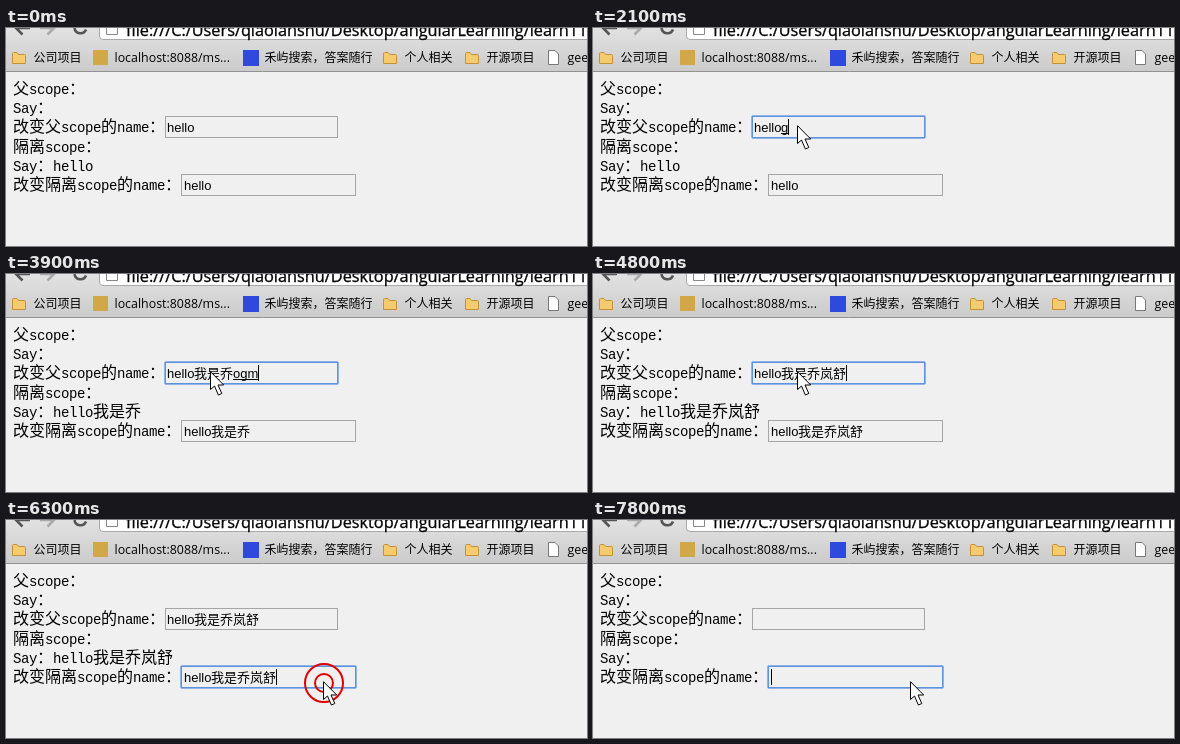
An HTML page for the animation above (8 s loop, 581 px wide and 218 px high).

```html
<!DOCTYPE html>
<html lang="zh-CN">
<head>
<meta charset="utf-8">
<title>Scope demo</title>
<style>
  html, body { margin: 0; width: 100%; height: 100%; overflow: hidden; background: #f0f0f0; }
  svg { display: block; }
  text { white-space: pre; fill: #000; }
  .page { font: 14px "Liberation Mono", monospace; letter-spacing: -.4px; }
  .page .cjk { font: 300 16px "Noto Sans CJK SC", "Noto Sans CJK", sans-serif; letter-spacing: 0; }
  .field { font: 13px "Liberation Sans", "Noto Sans CJK SC", "Noto Sans CJK", sans-serif; }
  .mark { font: 12.4px "Open Sans", sans-serif; }
  .mark .cjk { font: 12px "Noto Sans CJK SC", "Noto Sans CJK", sans-serif; }
  .url { font: 16.3px "Open Sans", sans-serif; stroke: #000; stroke-width: .3; }
</style>
</head>
<body>
<svg width="581" height="218" viewBox="0 0 581 218">
  <defs>
    <linearGradient id="bar" x2="0" y2="1">
      <stop offset="0" stop-color="#e2e2e2"/>
      <stop offset="1" stop-color="#cbcbcb"/>
    </linearGradient>
    <path id="folder" d="M.5 13.5V3.5Q.5 2.5 1.5 2.5H5L6.5 4.5H12.5Q13.5 4.5 13.5 5.5V13.5Z" fill="#f5cb70" stroke="#c4913a"/>
    <path id="sheet" d="M2.5 .5H9L12.5 4V14.5H2.5Z" fill="#fff" stroke="#777"/>
    <rect id="tan" width="15" height="15" fill="#d2a748"/>
    <rect id="blue" width="16" height="16" fill="#2f49dc"/>
    <path id="arrow" d="M.5 .7V18.5L4.5 15L8.4 24L11.8 22.5L8 14H13.7Z" fill="#fff" stroke="#000"/>
  </defs>
  <rect width="581" height="218" fill="#f0f0f0"/>
  <rect width="581" height="43" fill="url(#bar)"/>
  <path d="M0 43.5H581" stroke="#919191"/>
  <path d="M93.5 -2V8Q93.5 11.5 97 11.5H590V-2Z" fill="#fff" stroke="#a8a8a8"/>
  <g fill="none" stroke-width="2.6">
    <path d="M24 0H10L16.5 6.5" stroke="#555"/>
    <path d="M34 0H48L41.5 6.5" stroke="#aaa"/>
    <path d="M68.5 0A6 6 0 0 0 80 1.5" stroke="#555"/>
    <path d="M100.5 -2V6.5H111.5V-2" stroke="#888" stroke-width="1"/>
  </g>
  <g id="still"></g>
  <g id="live"></g>
</svg>
<script>
const $ = id => document.getElementById(id);
const text = (kind, x, y, s) => `<text class="${kind}" x="${x}" y="${y}">` +
  s.replace(/[^\x00-\x7f]+/g, m => `<tspan class="cjk">${m}</tspan>`) + '</text>';

const bookmarks = [
  [6, 'folder', '公司项目'], [87, 'tan', 'localhost:8088/ms...'], [237, 'blue', '禾屿搜索，答案随行'],
  [377, 'folder', '个人相关'], [459, 'folder', '开源项目'], [540, 'sheet', 'geek']
];
const lines = scope => [`${scope}scope：`, 'Say：', `改变${scope}scope的name：`];

$('still').innerHTML =
  text('url', 120, 7.5, 'file:///C:/Users/qiaolanshu/Desktop/angularLearning/learn11') +
  bookmarks.map(([x, icon, label]) => `<use href="#${icon}" x="${x}" y="22"/>` + text('mark', x + 21.5, 34, label)).join('') +
  ['父', '隔离'].flatMap((scope, g) => lines(scope).map((s, i) => text('page', 7, 66 + 58 * g + 19 * i, s))).join('');

// Each track maps a start time in ms to a value; "|" separates letters still being composed.
const typed = {
  0: 'hello', 2100: 'hello|g', 2700: 'hello我是', 3300: 'hello我是|s', 3600: 'hello我是乔|o',
  3900: 'hello我是乔|ogm', 4200: 'hello我是乔岚', 4500: 'hello我是乔岚|yy', 4800: 'hello我是乔岚舒',
  6900: 'hello我是乔岚', 7200: 'hello我', 7800: ''
};
const pointer = { 0: null, 300: [255, 166], 600: [204, 97], 5700: [275, 145], 6000: [319, 156], 6300: [317, 161] };
const focus = { 0: -1, 900: 0, 6300: 1 };
const caret = { 0: true, 1500: false, 2100: true, 5100: false, 6000: true, 6600: false, 6900: true };

const at = (track, t) => track[Object.keys(track).findLast(k => k <= t)];

function field(x, y, w, textX, [value, letters = ''], focused, blink) {
  const box = (inset, color, rx) => `<rect x="${x + inset}" y="${y + inset}" width="${w - 2 * inset}" ` +
    `height="${22 - 2 * inset}" rx="${rx}" fill="none" stroke="${color}"/>`;
  const base = y + 16;
  let s = focused ? box(-.5, '#8db3ea', 1.5) + box(.5, '#5d92dd', 0) : box(.5, '#a5a5a5', 0);
  s += text('field', textX, base, value.slice(0, 5));
  let end = textX + (value ? 27 : 0);
  for (const c of value.slice(5)) {
    s += text('field', end, base, c);
    end += 13;
  }
  if (letters) {
    const start = end;
    s += text('field', start, base, letters);
    for (const c of letters) end += c === 'm' ? 11 : 7;
    s += `<path d="M${start} ${base + 1.5}H${end}" stroke="#000"/>`;
  }
  if (focused && blink) s += `<rect x="${end}" y="${y + 3}" width="1" height="16"/>`;
  return s;
}

function draw(t) {
  const parts = at(typed, t).split('|');
  const active = at(focus, t), blink = at(caret, t), mouse = at(pointer, t);
  let s = text('page', 47, 143, parts[0]) +
    field(159, 88, 173, 161, active === 0 ? parts : [parts[0]], active === 0, blink) +
    field(175, 146, 175, 178, [parts[0]], active === 1, blink);
  if (mouse) {
    const [x, y] = mouse;
    // A click gives focus and shows its rings for 300 ms.
    const clicked = active !== at(focus, Math.max(0, t - 300));
    if (clicked) s += [19, 9].map(r =>
      `<circle cx="${x + 1}" cy="${y + 2}" r="${r}" fill="none" stroke="#e00000" stroke-width="2"/>`).join('');
    s += `<use href="#arrow" x="${x}" y="${y}"/>`;
  }
  return s;
}

let shown;
function tick() {
  const picture = draw(performance.now() % 8000);
  if (picture !== shown) $('live').innerHTML = shown = picture;
  requestAnimationFrame(tick);
}
tick();
</script>
</body>
</html>
```
